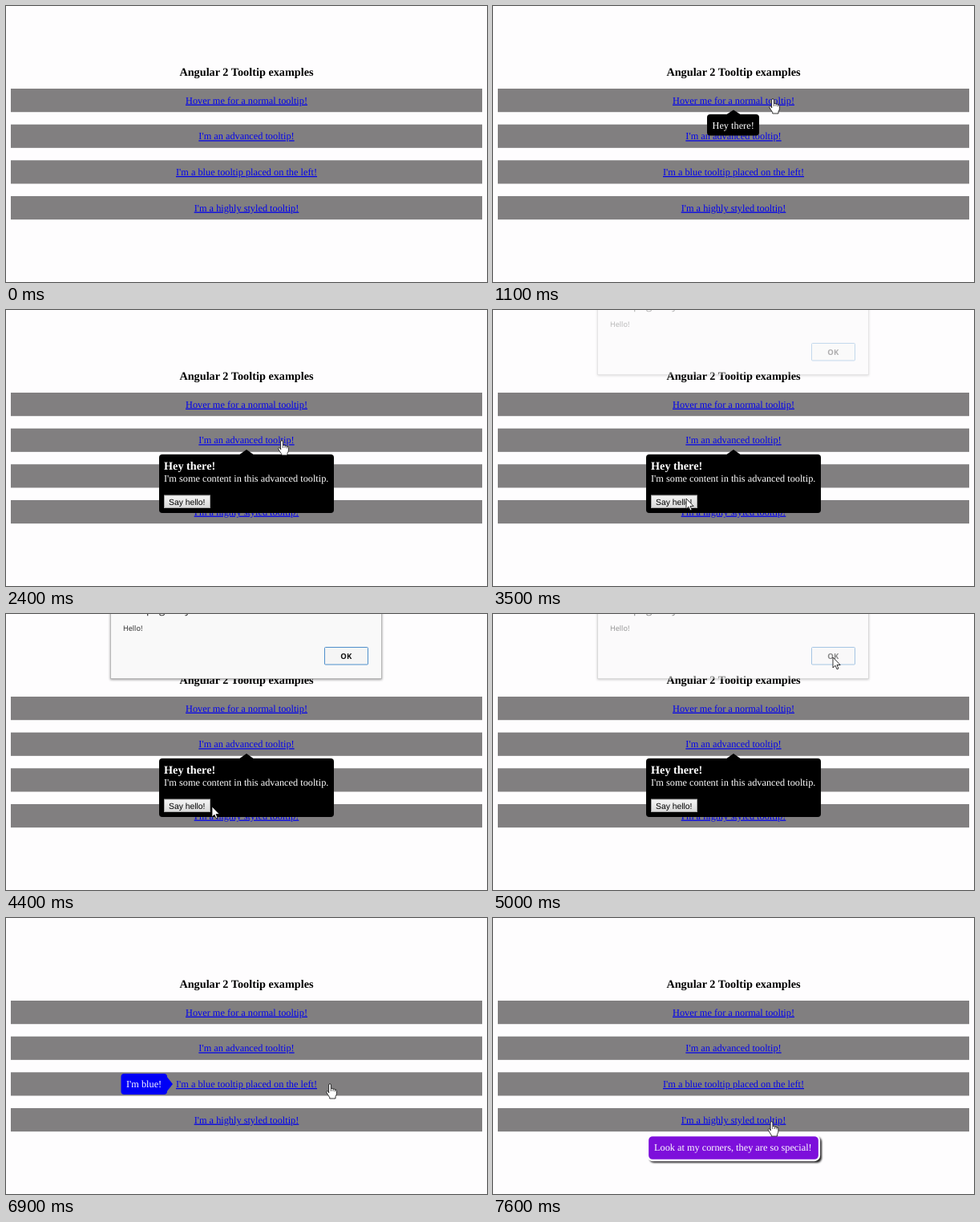
Write an HTML page that moves like this. It is 600 px wide and 344 px high and loops after 8 s.

```html
<!DOCTYPE html>
<html lang="en">
<head>
<meta charset="utf-8">
<title>Tooltip examples</title>
<style>
  html, body { margin: 0; width: 100%; height: 100%; overflow: hidden; background: #fefdfe; }
  svg { display: block; width: 600px; height: 344px; }
  text { font-family: "Liberation Serif", "Times New Roman", serif; font-size: 12.3px; text-rendering: geometricPrecision; }
  .title { font-size: 14.25px; font-weight: bold; }
  .link { fill: #0000ee; text-anchor: middle; text-decoration: underline; }
  .tip text { fill: #fff; }
  .tip .button { font: 10.35px "Liberation Sans", Arial, sans-serif; fill: #000; }
  #dialog text { font: 9.1px "Open Sans", sans-serif; fill: #222; }
  #dialog .says { font-size: 13.5px; }
  #dialog .ok { font-weight: bold; font-size: 9.5px; text-anchor: middle; fill: #111; }
  #dialog .panel { filter: drop-shadow(0 1px 1.5px rgba(0,0,0,.4)); }
  #arrow, #hand { fill: #fff; stroke: #111; stroke-width: .85; stroke-linejoin: round; }
</style>
</head>
<body>
<svg viewBox="0 0 600 344">
  <defs>
    <linearGradient id="face" x2="0" y2="1">
      <stop offset="0" stop-color="#f6f6f6"/>
      <stop offset="1" stop-color="#dadada"/>
    </linearGradient>
  </defs>

  <text class="title" x="300" y="87" text-anchor="middle">Angular 2 Tooltip examples</text>
  <g id="rows"></g>

  <g class="tip" id="plain">
    <path d="M290 136L300 129.5L310 136Z"/>
    <rect x="267" y="135" width="65" height="26.5" rx="4"/>
    <text x="273.5" y="152.5">Hey there!</text>
  </g>

  <g class="tip" id="advanced">
    <path d="M290 181L300 174L310 181Z"/>
    <rect x="191" y="180" width="218" height="73" rx="4"/>
    <text class="title" x="197" y="199">Hey there!</text>
    <text x="197" y="214">I'm some content in this advanced tooltip.</text>
    <rect x="197.5" y="231" width="57" height="15.5" fill="url(#face)" stroke="#a5a5a5"/>
    <text class="button" x="203" y="242.5">Say hello!</text>
  </g>

  <g class="tip" id="blue">
    <path d="M200 197L208 207L200 217Z" fill="#0000f6"/>
    <rect x="143.5" y="194" width="57.5" height="26" rx="4" fill="#0000f6"/>
    <text x="150" y="211">I'm blue!</text>
  </g>

  <g class="tip" id="styled">
    <rect x="195" y="273" width="215" height="32" rx="6" fill="#222" style="filter:blur(1px)"/>
    <rect x="193" y="271" width="214" height="31" rx="6" fill="#7d0fdb" stroke="#fff" stroke-width="2.3"/>
    <text x="201" y="290">Look at my corners, they are so special!</text>
  </g>

  <g id="dialog">
    <rect class="panel" x="130.5" y="-20" width="338" height="100.5" fill="#f9f9f9" stroke="#b8b8b8"/>
    <text class="says" x="146" y="-1.5">This page says:</text>
    <text x="146" y="21.3">Hello!</text>
    <rect x="397.5" y="41.5" width="54" height="21.5" rx="1" fill="#f5f5f5" stroke="#4f8fcb"/>
    <text class="ok" x="424.3" y="55.5">OK</text>
  </g>

  <path id="arrow" d="M0 0V13L3 10.2L5 14.8L7 14L5 9.5H9.2Z"/>
  <g id="hand">
    <path d="M-1.4 11V1Q-1.4 -.3 0 -.3T1.4 1V5.6Q3.6 4.8 4 6.2Q6 5.6 6.4 7Q8.4 6.6 8.4 8.6V11.5Q8.4 14 7 15.5V18H-.3V16.5Q-2.5 13.5 -4 10.6Q-4.6 9 -3.3 8.6Q-2.2 8.6 -1.4 10.4Z"/>
    <path d="M1.4 5.6V9M4 6.2V9M6.4 7V9.4" fill="none" stroke-width=".7"/>
  </g>
</svg>
<script>
const LOOP = 8000, STEP = 100;
const $ = id => document.getElementById(id);

const links = [
  "Hover me for a normal tooltip!",
  "I'm an advanced tooltip!",
  "I'm a blue tooltip placed on the left!",
  "I'm a highly styled tooltip!"
];
$("rows").innerHTML = links.map((label, i) => {
  const y = 103 + i * 44.65;
  return `<rect x="6" y="${y}" width="588" height="29.2" fill="#817f80"/>
    <text class="link" x="300" y="${y + 18.7}">${label}</text>`;
}).join("");

// id: fade-in start and end, fade-out start and end
const fades = {
  plain: [700, 900, 1400, 1700],
  advanced: [1900, 2300, 5000, 5300],
  dialog: [3400, 3700, 4900, 5100],
  blue: [5900, 6300, 6900, 7200],
  styled: [7300, 7600, LOOP, LOOP + 1]
};

// time, x, y, shape used from this point on
const track = [
  [800, 366, 113, "hand"], [900, 360, 116, "hand"], [1000, 360, 116, "hand"],
  [1100, 349, 116, "hand"], [1400, 349, 116, "hand"], [1600, 350, 128, "arrow"],
  [1900, 348, 155, "hand"], [2300, 345, 162, "hand"], [2400, 344, 163, "hand"],
  [2700, 344, 163, "hand"], [2800, 337, 171, "arrow"], [3300, 241, 235, "arrow"],
  [3600, 241, 235, "arrow"], [3900, 257, 241, "arrow"], [4400, 257, 240, "arrow"],
  [4800, 424, 54, "arrow"], [5000, 424, 54, "arrow"], [5300, 450.5, 228, "arrow"],
  [5500, 480, 236, "arrow"], [5600, 480, 236, "arrow"], [6000, 387, 209, "hand"],
  [6300, 378, 207, "hand"], [6800, 378, 207, "hand"], [6900, 404, 207, "hand"],
  [7000, 436, 222, "arrow"], [7100, 445, 239, "arrow"], [7200, 415, 251, "arrow"],
  [7400, 358, 255, "hand"], [7600, 347.5, 254, "hand"], [LOOP, 347.5, 254, "hand"]
];

const ramp = (t, a, b) => Math.min(1, Math.max(0, (t - a) / (b - a)));

function cursorAt(t) {
  const i = track.findIndex(k => k[0] > t) - 1;
  if (i < 0) return null;
  const [t0, x0, y0, shape] = track[i], [t1, x1, y1] = track[i + 1];
  let p = ramp(t, t0, t1);
  p = p * p * (3 - 2 * p);
  return { x: x0 + (x1 - x0) * p, y: y0 + (y1 - y0) * p, shape };
}

function render(ms) {
  const t = Math.floor(ms % LOOP / STEP) * STEP;
  for (const [id, [a, b, c, d]] of Object.entries(fades))
    $(id).setAttribute("opacity", ramp(t, a, b) - ramp(t, c, d));

  const cursor = cursorAt(t);
  for (const id of ["arrow", "hand"]) {
    const on = cursor && cursor.shape === id;
    $(id).setAttribute("visibility", on ? "visible" : "hidden");
    if (on) $(id).setAttribute("transform", `translate(${cursor.x} ${cursor.y})`);
  }
}

const start = performance.now();
function tick() {
  render(performance.now() - start);
  requestAnimationFrame(tick);
}
tick();
</script>
</body>
</html>
```
